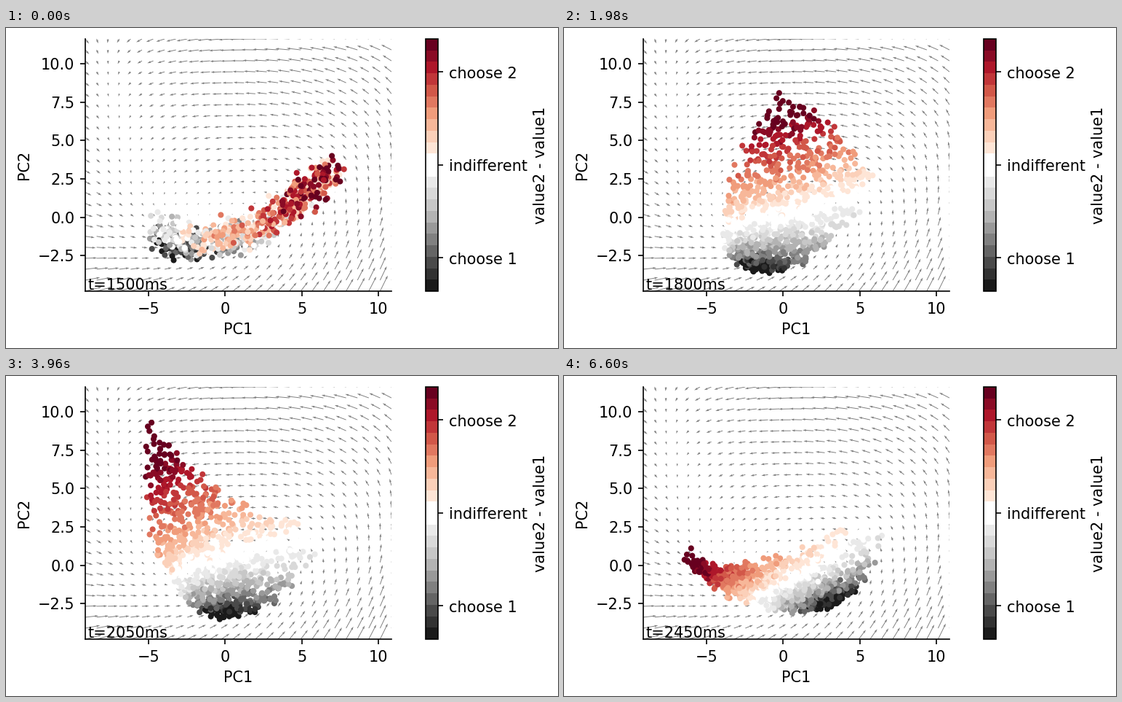
These frames come from a looping animation (759x439 px, 7930 ms). A matplotlib script:

```python
import numpy as np
import matplotlib.pyplot as plt
from matplotlib.animation import FuncAnimation
from matplotlib.colors import ListedColormap, Normalize

W, H, DPI = 759, 439, 150
LOOP, TICK, STEP, LAST = 7930, 65, 330, 20

plt.rcParams.update({"font.family": "DejaVu Sans", "font.size": 10})

# Corners, edge middles and centre of the cloud at a few steps.
# Rows: second value low, middle, high; columns: first value low, middle, high.
KEY_STEPS = np.array([0, 4, 6, 8, 12, 16, 20])
KEY_SHEETS = np.array([
    [[(-4.7, -0.7), (-4.3, -1.1), (-3.7, -1.7)],
     [(1.1, -0.8), (1.2, -1.0), (1.5, -1.2)],
     [(7.1, 3.5), (7.1, 3.3), (6.9, 3.0)]],
    [[(-4.3, -1.5), (-3.7, -2.3), (-3.0, -2.9)],
     [(-1.2, 2.4), (0.5, -0.2), (0.8, -2.8)],
     [(2.6, 7.0), (5.4, 5.4), (6.2, 2.2)]],
    [[(-4.0, -1.5), (-3.1, -2.5), (-2.0, -3.1)],
     [(-2.9, 3.5), (0.2, 0.2), (1.5, -2.7)],
     [(-0.3, 8.0), (3.8, 5.6), (5.9, 1.8)]],
    [[(-3.7, -1.4), (-2.7, -2.5), (-1.5, -3.2)],
     [(-4.2, 3.6), (-0.2, 0.4), (2.0, -2.4)],
     [(-2.5, 9.3), (1.7, 5.8), (5.6, 1.4)]],
    [[(-2.9, -1.3), (-1.6, -2.5), (0.0, -3.1)],
     [(-5.0, 2.8), (-0.5, 0.4), (3.8, -2.0)],
     [(-5.6, 9.0), (-1.6, 5.0), (6.4, 2.2)]],
    [[(-2.0, -2.0), (-0.6, -2.7), (1.2, -2.9)],
     [(-5.1, 0.6), (-0.2, -0.6), (4.3, -1.3)],
     [(-7.0, 4.1), (-2.8, 1.6), (6.6, 2.6)]],
    [[(-1.2, -2.7), (1.2, -2.8), (3.6, -2.2)],
     [(-4.6, -1.6), (0.0, -1.5), (5.9, -0.3)],
     [(-5.9, -0.2), (-3.2, -0.6), (6.0, 3.1)]],
])
KEY_SPEEDS = np.gradient(KEY_SHEETS, KEY_STEPS, axis=0)

# Flow in pixels at a coarse grid of places.
FLOW_X = [-9, -5, 0, 5, 10.8]
FLOW_Y = [11.6, 5, 0, -2.5, -4.8]
FLOW_U = [[3, -6, -20, -22, -15],
          [6, -1, -9, -10, -3],
          [10, 2, 0, 1, 3],
          [14, 7, 4, 6, 7],
          [25, 15, 10, 10, 10]]
FLOW_V = [[-7, -4, -1, 2, 6],
          [-4, -4, -1, 2, 10],
          [-2, -2, 0, 3, 13],
          [-1, -0.5, 2, 7, 16],
          [6, 5, 8, 14, 22]]


def cubic_terms(x, y):
    x, y = np.ravel(x) / 10, np.ravel(y) / 10
    return np.stack([x**i * y**j for i in range(4) for j in range(4 - i)], axis=1)


def smooth_field(values, x, y):
    nodes = cubic_terms(*np.meshgrid(FLOW_X, FLOW_Y))
    coef = np.linalg.lstsq(nodes, np.ravel(values), rcond=None)[0]
    return cubic_terms(x, y) @ coef


def sheet(step):
    """Cubic Hermite blend of the key sheets."""
    i = min(np.searchsorted(KEY_STEPS, step, side="right") - 1, len(KEY_STEPS) - 2)
    h = KEY_STEPS[i + 1] - KEY_STEPS[i]
    t = (step - KEY_STEPS[i]) / h
    return ((1 + 2 * t) * (1 - t)**2 * KEY_SHEETS[i]
            + t * (1 - t)**2 * h * KEY_SPEEDS[i]
            + t * t * (3 - 2 * t) * KEY_SHEETS[i + 1]
            + t * t * (t - 1) * h * KEY_SPEEDS[i + 1])


def quad_weights(t):
    return np.stack([(2 * t - 1) * (t - 1), 4 * t * (1 - t), t * (2 * t - 1)], axis=1)


rng = np.random.default_rng(4)
N = 1000
value1, value2 = rng.random((2, N))
diff = np.clip(1.25 * (value2 - value1), -1, 1)
order = np.argsort(diff + rng.normal(0, 0.25, N))
value1, value2, diff = value1[order], value2[order], diff[order]
jitter = np.clip(rng.normal(0, 1, (N, 2)), -2.2, 2.2)
w1, w2 = quad_weights(value1), quad_weights(value2)


def cloud(step):
    spread = 0.24 + 0.26 * max(0, 1 - step / 4)
    return np.einsum("ni,nj,ijk->nk", w2, w1, sheet(step)) + spread * jitter


def rect(left, top, right, bottom):
    return [left / W, 1 - bottom / H, (right - left) / W, (bottom - top) / H]


bands = plt.get_cmap("RdGy_r")(np.linspace(0, 1, 22))
bands[10:12] = 1
cmap, norm = ListedColormap(bands), Normalize(-1, 1)

# The small margin keeps the pixel size from being rounded down.
fig = plt.figure(figsize=((W + 0.01) / DPI, (H + 0.01) / DPI), dpi=DPI, facecolor="white")
ax = fig.add_axes(rect(109, 15, 530, 361))
ax.set(xlim=(-9.127, 10.854), ylim=(-4.815, 11.615), xlabel="PC1", ylabel="PC2",
       xticks=[-5, 0, 5, 10], yticks=np.arange(-2.5, 10.1, 2.5))
ax.spines[["top", "right"]].set_visible(False)

gx, gy = np.meshgrid(np.linspace(*ax.get_xlim(), 28), np.linspace(*ax.get_ylim(), 24))
ax.quiver(gx.ravel(), gy.ravel(), smooth_field(FLOW_U, gx, gy), smooth_field(FLOW_V, gx, gy),
          units="dots", scale_units="dots", scale=1, width=0.97, color="gray")
dots = ax.scatter(*cloud(0).T, c=diff, cmap=cmap, norm=norm, s=15, linewidths=0)
clock = ax.text(-8.95, -4.7, "")

cax = fig.add_axes(rect(577, 15, 594, 361))
bar = fig.colorbar(plt.cm.ScalarMappable(norm, cmap), cax=cax, ticks=[-0.737, 0, 0.737])
bar.ax.set_yticklabels(["choose 1", "indifferent", "choose 2"])
bar.set_label("value2 - value1")


def update(frame):
    step = min(LAST, int((frame + 0.5) * TICK // STEP))
    dots.set_offsets(cloud(step))
    clock.set_text(f"t={1500 + 50 * step}ms")
    return dots, clock


anim = FuncAnimation(fig, update, frames=LOOP // TICK, interval=TICK,
                     repeat=True, repeat_delay=0, blit=False)
plt.show()
```
